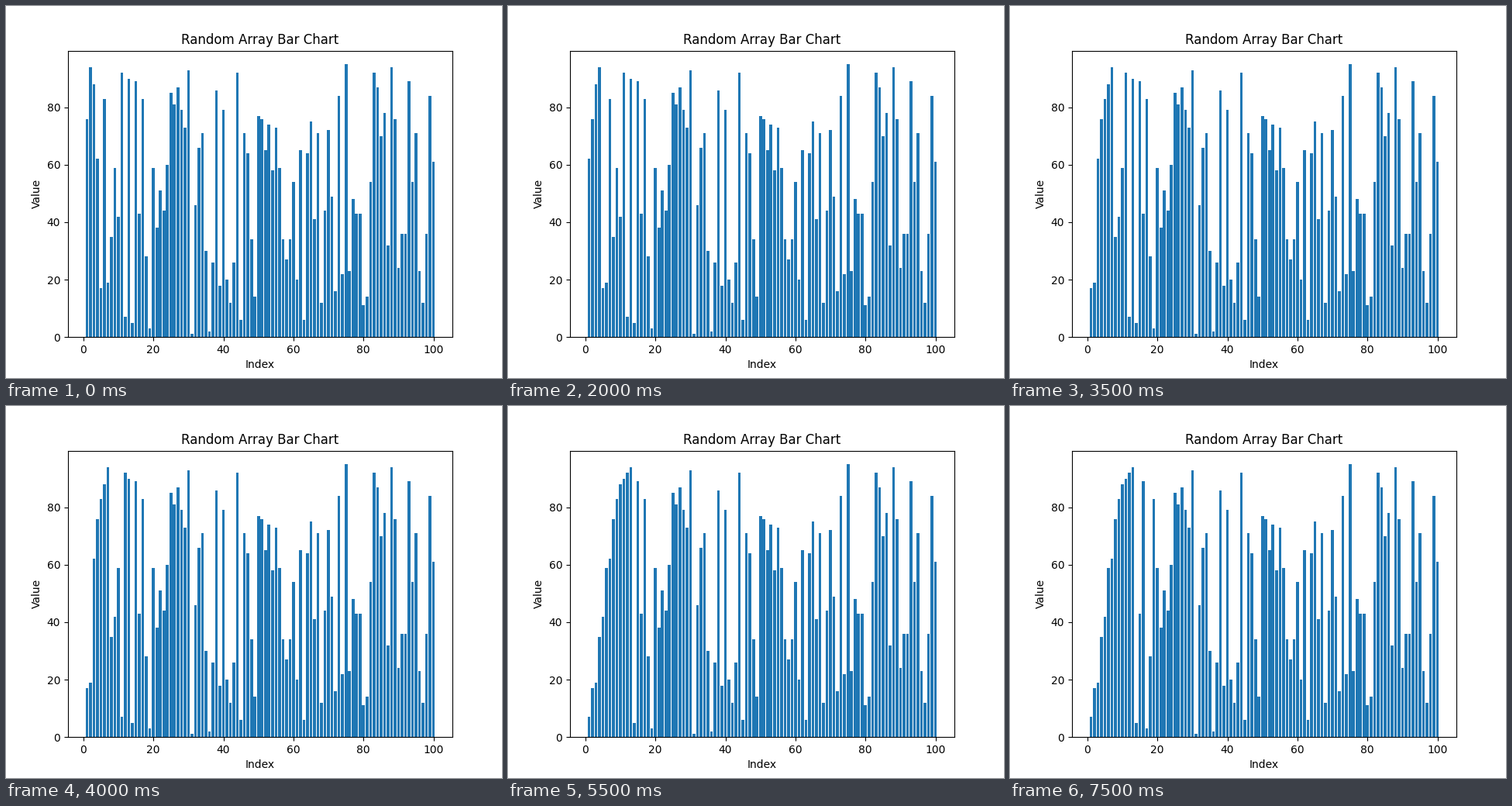
Recreate the animation shown at these times as a matplotlib script. Size 640 by 480 pixels, loop 8 s.

```python
import matplotlib.pyplot as plt
from matplotlib.animation import FuncAnimation

STEPS = 16
STEP_MS = 500

VALUES = [
    76, 94, 88, 62, 17, 83, 19, 35, 59, 42, 92, 7, 90, 5, 89, 43, 83, 28, 3, 59,
    38, 51, 44, 60, 85, 81, 87, 79, 73, 93, 1, 46, 66, 71, 30, 2, 26, 86, 18, 79,
    20, 12, 26, 92, 6, 71, 64, 34, 14, 77, 76, 65, 74, 58, 73, 59, 34, 27, 34, 54,
    20, 65, 6, 64, 75, 41, 71, 12, 44, 72, 49, 16, 84, 22, 95, 23, 48, 43, 43, 11,
    14, 54, 92, 87, 70, 78, 32, 94, 76, 24, 36, 36, 89, 54, 71, 23, 12, 36, 84, 61,
]


def merges(lo, hi):
    """Yield the inclusive ranges that a top-down merge sort merges, in order."""
    if lo < hi:
        mid = (lo + hi) // 2
        yield from merges(lo, mid)
        yield from merges(mid + 1, hi)
        yield lo, hi


def sort_states(values, count):
    """Return the array after each of the first `count` merges."""
    data = list(values)
    states = []
    for _, (lo, hi) in zip(range(count), merges(0, len(data) - 1)):
        data[lo:hi + 1] = sorted(data[lo:hi + 1])
        states.append(list(data))
    return states


states = sort_states(VALUES, STEPS)

fig, ax = plt.subplots(figsize=(6.4, 4.8), dpi=100)
bars = ax.bar(range(1, len(VALUES) + 1), states[0])
ax.set_title("Random Array Bar Chart")
ax.set_xlabel("Index")
ax.set_ylabel("Value")


def update(step):
    for bar, height in zip(bars, states[step]):
        bar.set_height(height)
    return bars.patches


anim = FuncAnimation(fig, update, frames=STEPS, interval=STEP_MS,
                     init_func=lambda: update(0), repeat=True, repeat_delay=0)
plt.show()
```
